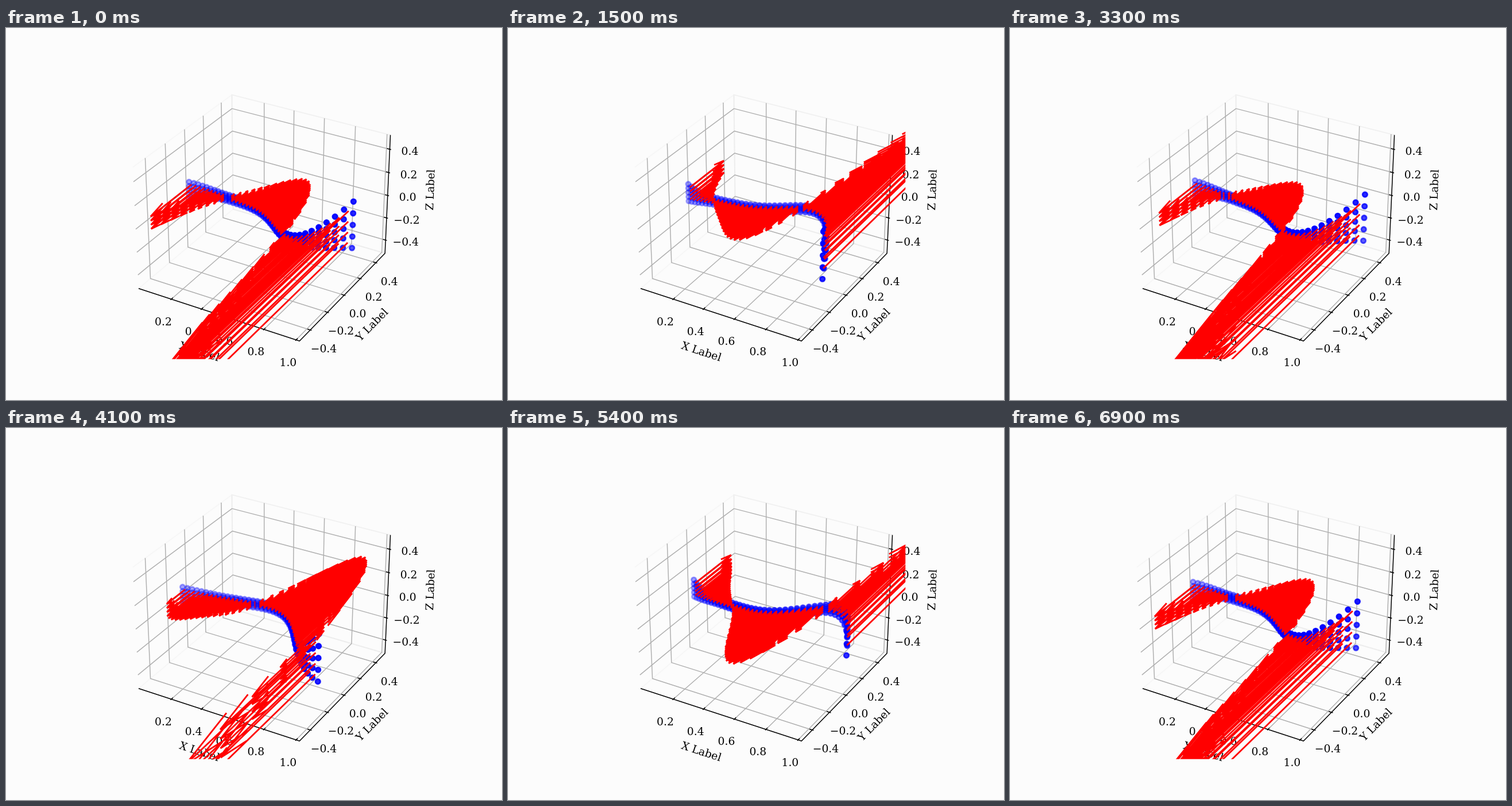
An HTML page with a canvas that plays this animation: 864x648 px, repeating every 7 s.

```html
<!DOCTYPE html>
<html>
<head>
<meta charset="utf-8">
<style>
html, body { margin: 0; width: 100%; height: 100%; overflow: hidden; background: #fcfcfc; }
canvas { display: block; }
</style>
</head>
<body>
<canvas id="stage" width="864" height="648"></canvas>
<script>
const ctx = document.getElementById('stage').getContext('2d');
const PT = 1.875;                  // pixels per point
const FRAMES = 70, FRAME_MS = 100;
const PANELS = 40, ROWS = 4;
const WAVE_NUMBER = 2 * Math.PI / 0.95, OMEGA = 6;
const LO = -0.5 - 1 / 48, HI = 0.5 + 1 / 48;   // box edges around the unit data range
const S30 = 0.5, C30 = Math.sqrt(3) / 2;

// Perspective camera: elevation 30, azimuth -60; x, y, z are centred on the box
function project(x, y, z) {
  const u = x * 8 / 7, v = y * 8 / 7, w = z * 6 / 7;
  const dist = 10 - (C30 * S30 * u - C30 * C30 * v + S30 * w);
  const right = C30 * u + S30 * v;
  const up = -S30 * S30 * u + S30 * C30 * v + C30 * w;
  return [449.54 + 2697 * right / dist, 320.5 - 2697 * up / dist, dist];
}

function path(...points) {
  points.forEach((p, i) => {
    const [x, y] = project(...p);
    i ? ctx.lineTo(x, y) : ctx.moveTo(x, y);
  });
}

function line(color, width, ...points) {
  ctx.strokeStyle = color;
  ctx.lineWidth = width;
  ctx.beginPath();
  path(...points);
  ctx.stroke();
}

function label(text, x, y, angle = 0) {
  ctx.save();
  ctx.translate(x, y);
  ctx.rotate(angle * Math.PI / 180);
  ctx.fillText(text, 0, 6.8);
  ctx.restore();
}

function tick(value, from, to, [px, py], dx, dy) {
  line('#000', 0.8 * PT, from, to);
  label(value.toFixed(1).replace('-', '\u2212'), px + dx, py + dy);
}

function drawAxes() {
  const out = 0.0087, inn = 0.0174, thin = 0.8 * PT;
  const steps = [-0.4, -0.2, 0, 0.2, 0.4];
  const xTicks = [0.2, 0.4, 0.6, 0.8, 1];
  ctx.lineJoin = 'round';
  line('rgba(242,242,242,.5)', PT, [LO, LO, LO], [LO, HI, LO], [LO, HI, HI], [LO, LO, HI]);
  line('rgba(236,236,236,.5)', PT, [LO, LO, LO], [HI, LO, LO], [HI, HI, LO], [LO, HI, LO]);
  line('rgba(229,229,229,.5)', PT, [HI, HI, LO], [LO, HI, LO], [LO, HI, HI], [HI, HI, HI]);

  for (const t of xTicks) line('#b0b0b0', thin, [t - 0.5, LO, LO], [t - 0.5, HI, LO], [t - 0.5, HI, HI]);
  for (const t of steps) {
    line('#b0b0b0', thin, [HI, t, LO], [LO, t, LO], [LO, t, HI]);
    line('#b0b0b0', thin, [LO, LO, t], [LO, HI, t], [HI, HI, t]);
  }
  line('#000', thin, [LO, LO, LO], [HI, LO, LO], [HI, HI, LO], [HI, HI, HI]);

  ctx.fillStyle = '#000';
  ctx.font = '18.75px "DejaVu Serif", serif';
  ctx.textAlign = 'center';
  for (const t of xTicks) {
    const x = t - 0.5;
    tick(t, [x, LO - out, LO], [x, LO + inn, LO], project(x, LO, LO), -14, 38.5);
  }
  for (const t of steps) {
    tick(t, [HI + out, t, LO], [HI - inn, t, LO], project(HI, t, LO), 23.5, 32);
    tick(t, [HI + out, HI, t], [HI - inn, HI, t], project(HI, HI, t), 35, 3);
  }
  label('X Label', 337, 563, 18.2);
  label('Y Label', 637, 516.5, -45.4);
  label('Z Label', 738.5, 282, -87.8);
}

const amplitude = x => 3.75 * (0.02 - 0.0825 * x + 0.1625 * x * x);
const sway = (x, phase) => amplitude(x) * Math.sin(WAVE_NUMBER * x - phase);
const swaySpeed = (x, phase) => -OMEGA * amplitude(x) * Math.cos(WAVE_NUMBER * x - phase);

// Body height: deep head, thin trunk, flaring tail
const height = x => 0.06
  + 0.09 * Math.max(0, 1 - x / 0.25) ** 2
  + 0.34 * Math.max(0, (x - 0.67) / 0.33) ** 3;

function drawNodes(phase) {
  const nodes = [];
  for (let i = 0; i <= PANELS; i++) {
    const x = i / PANELS;
    for (let j = 0; j <= ROWS; j++) {
      nodes.push(project(x - 0.5, sway(x, phase), height(x) * (j / ROWS - 0.5)));
    }
  }
  nodes.sort((a, b) => b[2] - a[2]);
  const far = nodes[0][2], near = nodes[nodes.length - 1][2];
  ctx.fillStyle = ctx.strokeStyle = '#00f';
  ctx.lineWidth = 1.5 * PT;
  for (const [x, y, dist] of nodes) {
    ctx.globalAlpha = 1 - 0.7 * (dist - near) / (far - near);
    ctx.beginPath();
    ctx.arc(x, y, Math.sqrt(20) / 2 * PT, 0, 2 * Math.PI);
    ctx.fill();
    ctx.stroke();
  }
  ctx.globalAlpha = 1;
}

function drawArrows(phase) {
  const headY = 0.3 * Math.cos(Math.PI / 12), headZ = 0.3 * Math.sin(Math.PI / 12);
  ctx.strokeStyle = '#f00';
  ctx.lineWidth = 1.5 * PT;
  ctx.beginPath();
  for (let i = 0; i < PANELS; i++) {
    const a = i / PANELS, b = (i + 1) / PANELS, mid = (a + b) / 2, x = mid - 0.5;
    const y = (sway(a, phase) + sway(b, phase)) / 2;
    const v = swaySpeed(mid, phase), tip = y + v;
    for (let j = 0; j < ROWS; j++) {
      const z = (height(a) + height(b)) / 2 * ((j + 0.5) / ROWS - 0.5);
      path([x, y, z], [x, tip, z]);
      path([x, tip, z], [x, tip - headY * v, z + headZ * v]);
      path([x, tip, z], [x, tip - headY * v, z - headZ * v]);
    }
  }
  ctx.stroke();
}

function render(now) {
  const frame = Math.floor(now / FRAME_MS) % FRAMES;
  const phase = frame / (FRAMES - 1) * 4 * Math.PI;
  ctx.fillStyle = '#fcfcfc';
  ctx.fillRect(0, 0, 864, 648);
  drawAxes();
  ctx.save();
  ctx.beginPath();
  ctx.rect(193.3, 77.8, 499, 499);
  ctx.clip();
  drawNodes(phase);
  drawArrows(phase);
  ctx.restore();
}

const start = performance.now();
function loop() {
  render(performance.now() - start);
  requestAnimationFrame(loop);
}
loop();
</script>
</body>
</html>
```
